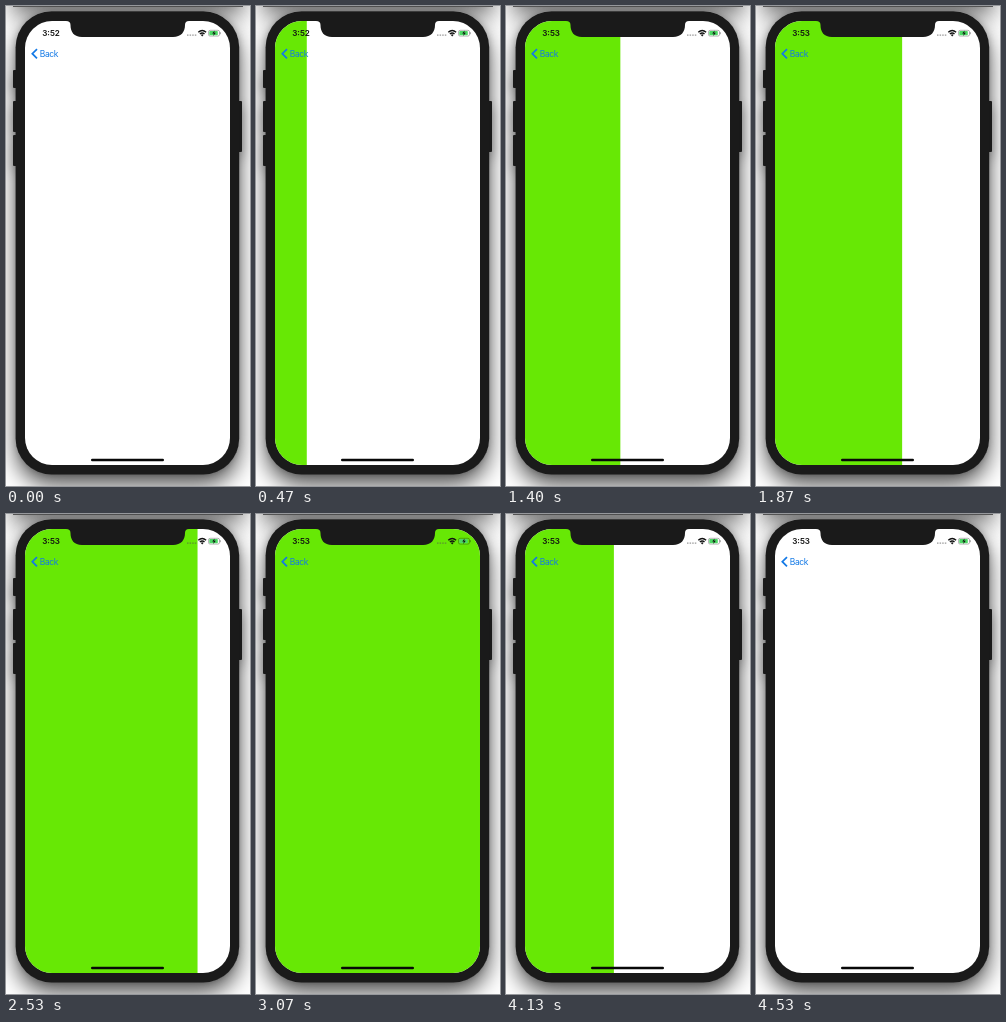
Write an HTML page that moves like this. It is 244 by 480 pixels and loops after 5270 ms.

```html
<!DOCTYPE html>
<html lang="en">
<head>
<meta charset="utf-8">
<style>
  html, body { margin: 0; width: 100%; height: 100%; overflow: hidden; background: #fff; }
  #stage { position: relative; width: 244px; height: 480px; overflow: hidden; }
  #stage > * { position: absolute; }
  #bar {
    left: 7px; top: -40px; width: 230px; height: 41px; background: #555;
    box-shadow: 0 8px 24px rgba(0, 0, 0, .6);
  }
  #shadow {
    left: 10px; top: 5px; width: 223px; height: 463px; border-radius: 36px;
    box-shadow: 0 11px 22px rgba(0, 0, 0, .68), 0 0 6px rgba(0, 0, 0, .22);
  }
  svg { left: 0; top: 0; }
  #buttons { filter: drop-shadow(0 6px 6px rgba(0, 0, 0, .4)); }
  text { font-family: Inter, "Liberation Sans", sans-serif; }
</style>
</head>
<body>
<div id="stage">
  <div id="bar"></div>
  <div id="shadow"></div>
  <svg width="244" height="480" viewBox="0 0 244 480">
    <defs>
      <clipPath id="screen"><rect x="19" y="15" width="205" height="444" rx="27"/></clipPath>
    </defs>

    <!-- phone body and side buttons -->
    <g fill="#1a1a1a">
      <g id="buttons">
        <rect x="7" y="64" width="5" height="18" rx="1"/>
        <rect x="7" y="95" width="5" height="31" rx="1"/>
        <rect x="7" y="129" width="5" height="31" rx="1"/>
        <rect x="231" y="95" width="5" height="51" rx="1"/>
      </g>
      <rect x="9.6" y="5.3" width="223.6" height="463.2" rx="36"/>
    </g>

    <g clip-path="url(#screen)">
      <rect x="19" y="14" width="205" height="446" fill="#fff"/>
      <rect id="fill" x="19" y="14" width="0" height="446" fill="#67e805"/>
    </g>
    <path d="M60 14H183V15Q179 15.2 179 19C179 26 175 31 167 31H76C68 31 64.5 26 64.5 19Q64.5 15.2 60 15Z" fill="#1a1a1a"/>

    <!-- status bar -->
    <text id="clock" x="36.2" y="30.4" font-size="8.1" font-weight="600" fill="#111">3:52</text>
    <path d="M181 29.2H190.500" stroke="#555" stroke-opacity=".6" stroke-width="1.3" stroke-dasharray="1.5 1.1"/>
    <g fill="none" stroke="#111" stroke-width="1.4">
      <path d="M192.300 26.300Q196.200 22.700 200.100 26.300"/>
      <path d="M193.900 28Q196.200 25.900 198.500 28"/>
    </g>
    <path d="M194.900 28.900Q196.200 27.800 197.500 28.900L196.200 30.400Z" fill="#111"/>
    <rect x="202.500" y="24.300" width="11" height="5.800" rx="1.600" fill="none" stroke="#111" stroke-opacity=".42" stroke-width=".7"/>
    <rect x="203.300" y="25.100" width="8.500" height="4.200" rx=".8" fill="#4cd964"/>
    <path d="M214.300 26.200V28.200" stroke="#111" stroke-opacity=".45" stroke-width=".9"/>
    <path d="M208.600 24.600L206.200 27.600H207.800L207.300 29.900L209.800 26.800H208.200Z" fill="#111"/>

    <!-- navigation and home bar -->
    <path d="M31 43.100L26.300 47.700L31 52.300" fill="none" stroke="#1379e6" stroke-width="1.7"/>
    <text x="33.800" y="50.800" font-size="8.500" letter-spacing="-.4" fill="#1379e6">Back</text>
    <rect x="85" y="452.800" width="73" height="2.500" rx="1.250" fill="#080808"/>
  </svg>
</div>
<script>
  const LOOP = 5270, STEP = 1000 / 15, WIDTH = 205;
  const fill = document.getElementById('fill');
  const clock = document.getElementById('clock');

  // Steady three-second fill, a pause, then an eased return.
  function progress(t) {
    if (t < 3790) return Math.min(1, t / 3010);
    const p = Math.min(1, (t - 3694) / 810);
    return (1 + Math.cos(Math.PI * p)) / 2;
  }

  function draw(now) {
    const t = Math.floor((now % LOOP + 4) / STEP) * STEP;
    fill.setAttribute('width', WIDTH * progress(t));
    clock.textContent = t < 1060 ? '3:52' : '3:53';
  }

  const start = performance.now();
  function tick() {
    draw(performance.now() - start);
    requestAnimationFrame(tick);
  }
  tick();
</script>
</body>
</html>
```
